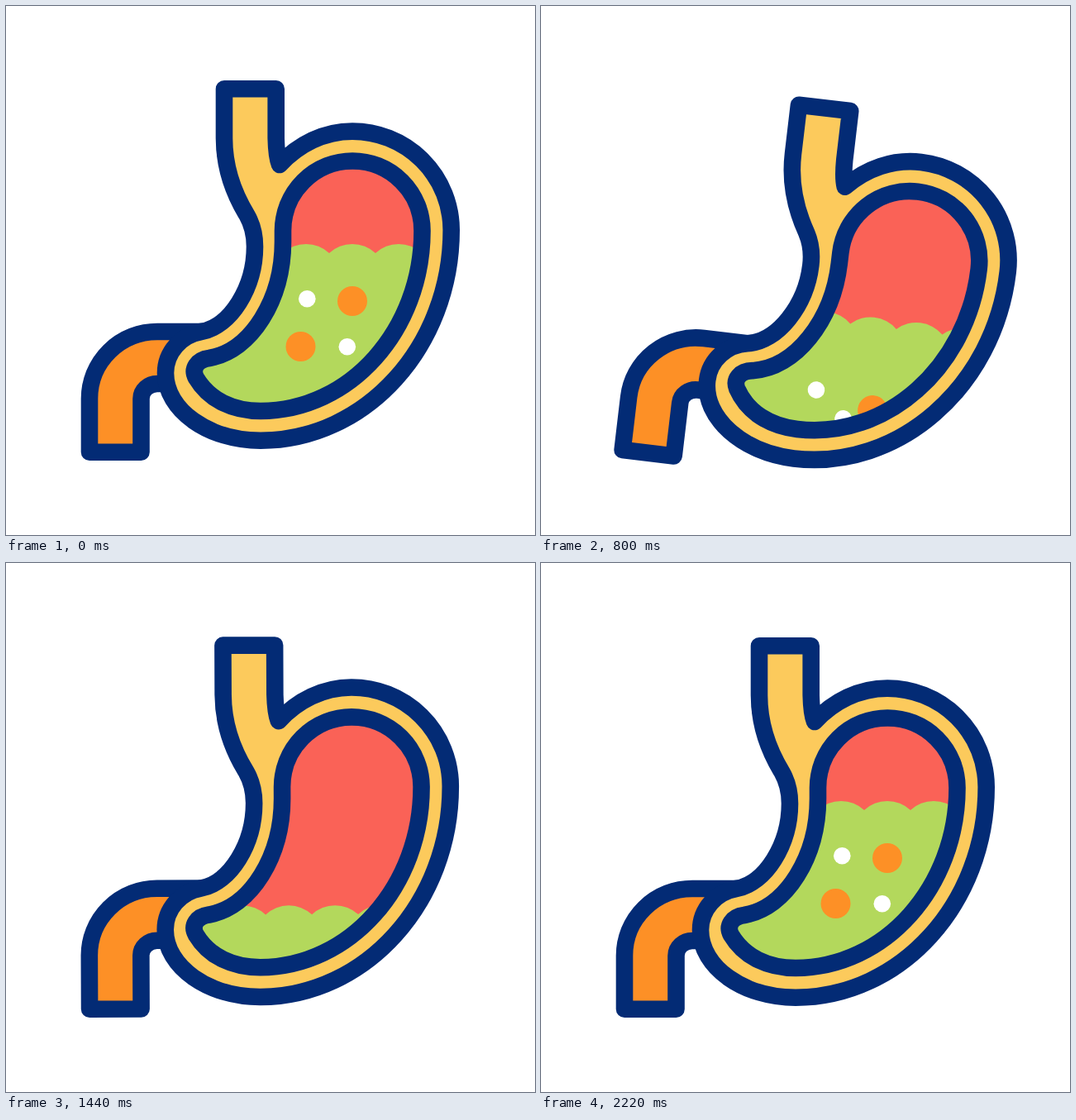
An HTML page that plays this animation: 640 px wide and 640 px high, repeating every 2400 ms.

```html
<!DOCTYPE html>
<html lang="en">
<head>
<meta charset="utf-8">
<title>Stomach</title>
<style>
  html, body { margin: 0; width: 100%; height: 100%; overflow: hidden; background: #fff; }
  svg { display: block; width: 100%; height: 100%; }
  .outline { stroke: #032b75; stroke-width: 20.6; stroke-linejoin: round; }
</style>
</head>
<body>
<svg viewBox="0 0 640 640">
  <defs>
    <path id="cavity" d="M335 272 A84.25 84.5 0 0 1 503.5 272 C503.5 392 416 490 308 490
      C275 490 246 477 230 450 C224 439 231 428 246 426 C297 417 335 355 335 285Z"/>
    <clipPath id="inside"><use href="#cavity"/></clipPath>
  </defs>
  <g id="stomach">
    <path class="outline" fill="#fd9026" d="M101 539.7 V475 A82 81 0 0 1 183 394 H240 L215 457 H183
      A19.5 18 0 0 0 163.5 475 V539.7Z"/>
    <path class="outline" fill="#fcca5c" d="M264 100.2 H326.7 V160 C327 175 328 184 331 192
      C354 167 385 151.6 419 151.6 A119.5 119.5 0 0 1 538.7 271 C538.7 412 435 525.7 308 525.7
      C245 525.7 193 489 193 444 C193 419 212 398 236 394 C272 388 301 340 301 291
      C301 280 300 268 291.5 253 C275 226 264 195 264 160Z"/>
    <use href="#cavity" fill="#fa6257"/>
    <g clip-path="url(#inside)">
      <path id="liquid" fill="#b3d85c"/>
      <g id="dots"></g>
    </g>
    <use href="#cavity" class="outline" fill="none"/>
  </g>
</svg>
<script>
const LOOP = 2400, START = 200, PEAK = 1500, END = 2200;
const SWING = [0, 8, -4, 4, 0], SWING_STEP = 500;
const DRIFT = [-77, 128];
const $ = id => document.getElementById(id);

// bend and sink shape each dot's own way down; rise is its offset at the start of the way back
const dots = [
  { at: [419, 357], r: 18, fill: '#fd9026', bend: [35, 27], sink: [2.5, 50], rise: [0, 28] },
  { at: [356.5, 412], r: 18, fill: '#fd9026', bend: [-27, 36], sink: [0, 45], rise: [9, 17] },
  { at: [364.3, 354.3], r: 10.3, fill: '#fff', bend: [-27, 36], sink: [3, 27.5], rise: [-26, 31] },
  { at: [412.8, 412.2], r: 10.3, fill: '#fff', bend: [-35, 3], sink: [-11, 1.5], rise: [-6, 2] }
];

for (const dot of dots) {
  dot.node = document.createElementNS('http://www.w3.org/2000/svg', 'circle');
  dot.node.setAttribute('r', dot.r);
  dot.node.setAttribute('fill', dot.fill);
  $('dots').append(dot.node);
}
$('liquid').setAttribute('d', 'M223 299' + 'a41 41 0 0 1 56 0'.repeat(7) + 'V560H223Z');

function ease(t, from, to) {
  const p = Math.min(1, Math.max(0, (t - from) / (to - from)));
  return p * p * (3 - 2 * p);
}

function swingAngle(t) {
  return SWING.slice(1).reduce((angle, target, i) => {
    const from = START + i * SWING_STEP;
    return angle + (target - SWING[i]) * ease(t, from, from + SWING_STEP);
  }, 0);
}

function draw(now) {
  const t = now % LOOP;
  const level = t < PEAK ? ease(t, START, PEAK) : 1 - ease(t, PEAK, END);
  const drift = DRIFT.map(d => d * level);
  const u = ease(t, START, 1000);

  $('stomach').setAttribute('transform', `rotate(${swingAngle(t)} 122 518)`);
  $('liquid').setAttribute('transform', `translate(${drift})`);
  for (const { node, at, bend, sink, rise } of dots) {
    const [x, y] = at.map((v, i) => v + drift[i] +
      (t < PEAK ? 2 * u * (1 - u) * bend[i] + u * u * sink[i] : level * rise[i]));
    node.setAttribute('cx', x);
    node.setAttribute('cy', y);
  }
}

const begin = performance.now();
function tick() {
  draw(performance.now() - begin);
  requestAnimationFrame(tick);
}
tick();
</script>
</body>
</html>
```
